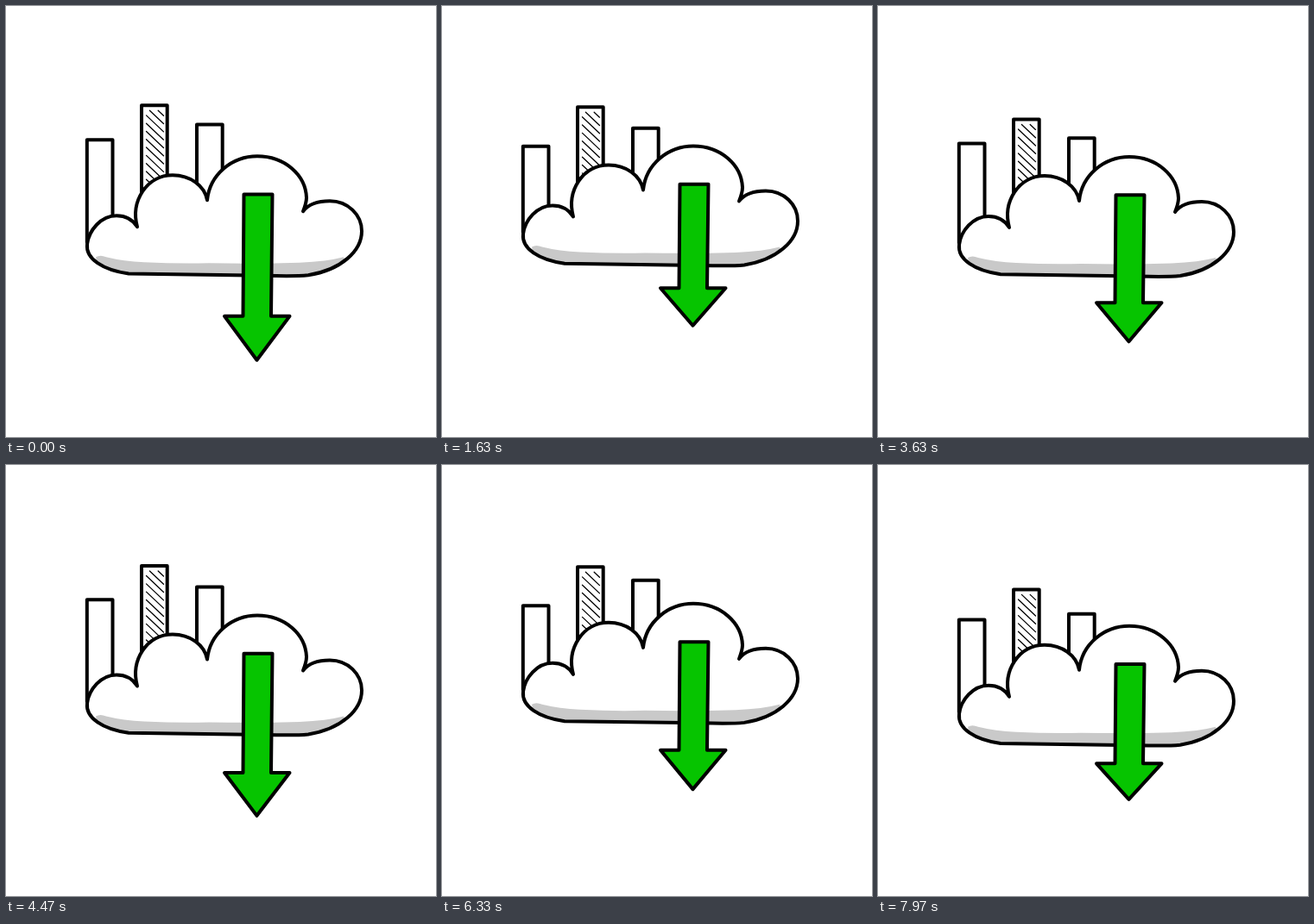
Write an HTML page that moves like this. It is 498 px wide and 500 px high and loops after 8 s.

```html
<!DOCTYPE html>
<html lang="en">
<head>
<meta charset="utf-8">
<title>Cloud download</title>
<style>
html, body { margin: 0; width: 100%; height: 100%; overflow: hidden; background: #fff; }
svg { display: block; width: 100%; height: 100%; }
.ink { stroke: #000; stroke-width: 4; stroke-linejoin: round; stroke-linecap: round; fill: #fff; }
#hatch { stroke: #000; stroke-width: 1.3; stroke-linecap: round; fill: none; }
</style>
</head>
<body>
<svg viewBox="0 0 498 500">
  <defs>
    <path id="outline" d="M94 276C96 260 110 243 128 243C139 243 147 248 152 256C144 226 163 196 193 196C213 196 230 208 233 225C236 195 262 174 291 174C323 174 347 196 348 222C348 227 346 233 344 238C350 230 362 226 375 226C396 226 412 242 412 261C412 284 388 306 350 312Q335 313.500 300 312.500L142 310.300C112 306 92 293 94 276Z"/>
    <clipPath id="inside"><use href="#outline"/></clipPath>
  </defs>
  <g id="scene">
    <path id="bar0" class="ink"/>
    <path id="bar1" class="ink"/>
    <path id="hatch"/>
    <path id="bar2" class="ink"/>
    <use href="#outline" fill="#fff"/>
    <path clip-path="url(#inside)" fill="#c9c9c9" d="M104 291Q109 288 116 291Q136 296 160 297Q200 299 235 298Q290 299 340 297.500Q372 296 391 291L400 320H110Z"/>
    <use href="#outline" class="ink" style="fill:none"/>
    <path id="arrow" class="ink" style="fill:#06c400"/>
  </g>
</svg>
<script>
const LOOP = 8000;
const $ = id => document.getElementById(id);

// Turning points of the cloud's drift, as [ms, y].
const drift = [[-350, 1], [1950, -12.2], [4020, 2.2], [6120, -13.8], [8230, 13.7]];

// Each bar swings between its top and a low point; turns are the times it reverses.
const bars = [
  { x: 93.8, top: 155, sink: 21.5, turns: [0, 2050, 4200, 6350, 9800] },
  { x: 157, top: 115, sink: 23, turns: [0, 2900, 4780, 7200, 9400] },
  { x: 221, top: 137.3, sink: 23, turns: [0, 2600, 5150, 7800, 10200] }
];
for (const bar of bars) bar.keys = bar.turns.map((t, i) => [t, bar.top + bar.sink * (i % 2)]);

// Ease from one turning point to the next with half a cosine.
function swing(keys, t) {
  const i = keys.findIndex(key => key[0] > t);
  const [t0, y0] = keys[i - 1], [t1, y1] = keys[i];
  return y0 + (y1 - y0) * (1 - Math.cos(Math.PI * (t - t0) / (t1 - t0))) / 2;
}

function hatchPath(top) {
  const left = 162.5, width = 20, slope = 0.95;
  let d = "";
  for (let y = -13; y < 85; y += 9.3) {
    const skip = Math.max(0, -y / slope);
    d += `M${left + skip} ${top + 6 + y + skip * slope}L${left + width} ${top + 6 + y + width * slope}`;
  }
  return d;
}

function arrowPath(len) {
  const top = 218.3, neck = top + len * 0.735, tip = top + len;
  return `M275.500 ${top}H308.500L307 ${neck}H328.500L290.500 ${tip}L253 ${neck}H274.500Z`;
}

function draw(t) {
  $("scene").setAttribute("transform", `translate(0 ${swing(drift, t)})`);
  bars.forEach(({ x, keys }, i) => {
    const top = swing(keys, t);
    $("bar" + i).setAttribute("d", `M${x} 274V${top}h29.700V274`);
    if (i === 1) $("hatch").setAttribute("d", hatchPath(top));
  });
  $("arrow").setAttribute("d", arrowPath(172.9 + 19.3 * Math.cos(t * 2 * Math.PI / 5000)));
}

const start = performance.now();
function tick() {
  draw(Math.max(0, performance.now() - start) % LOOP);
  requestAnimationFrame(tick);
}
tick();
</script>
</body>
</html>
```
